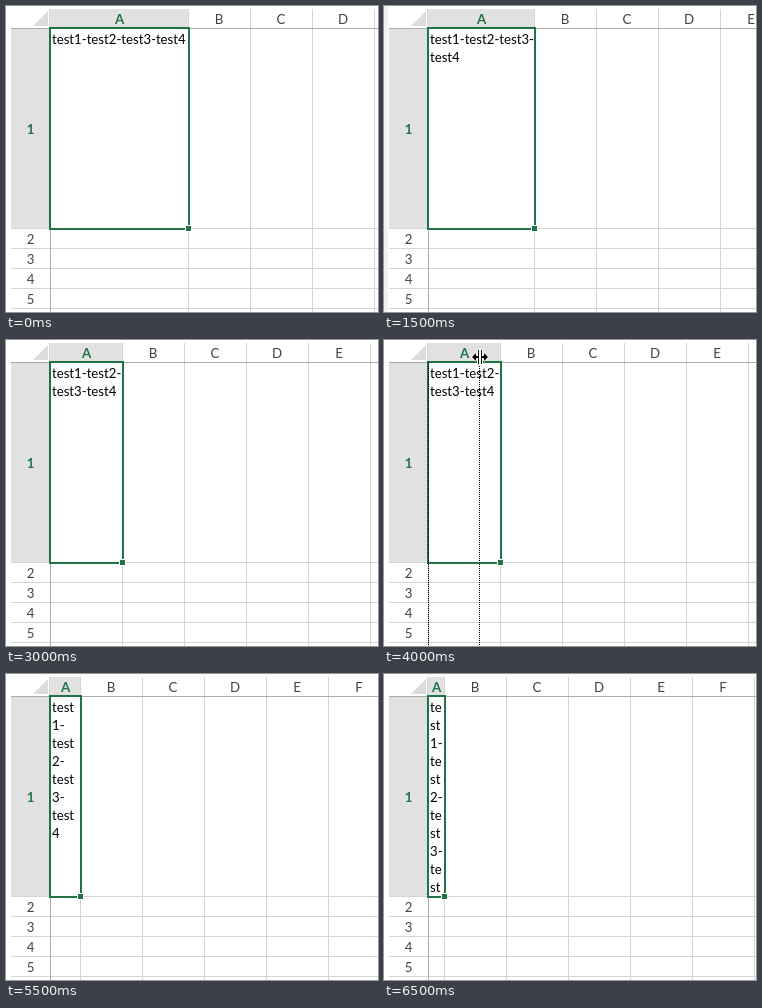
Animation of 372x306 px, one loop 7 s. Source, as an HTML page with a canvas:

```html
<!DOCTYPE html>
<html lang="en">
<head>
<meta charset="utf-8">
<title>Column resize</title>
<style>
html, body { margin: 0; width: 100%; height: 100%; overflow: hidden; background: #fff; }
canvas { display: block; }
</style>
</head>
<body>
<canvas id="stage" width="372" height="306"></canvas>
<script>
const ctx = document.getElementById('stage').getContext('2d');
const W = 372, H = 306, LEFT = 44, TOP = 22, BOTTOM = 222, COLUMN = 62, STEP = 500;
const GREEN = '#217346', GRID = '#d4d4d4', RULE = '#ababab', SHADE = '#e1e1e1';

const wrapped = {
  one: ['test1-test2-test3-test4'],
  two: ['test1-test2-test3-', 'test4'],
  half: ['test1-test2-', 'test3-test4'],
  four: ['test1-', 'test2-', 'test3-', 'test4'],
  eight: ['test', '1-', 'test', '2-', 'test', '3-', 'test', '4'],
  narrow: ['te', 'st', '1-', 'te', 'st', '2-', 'te', 'st', '3-', 'te', 'st']
};

// edge: right side of column A; cursor: [x, y]; guide: dragged dotted line
const steps = [
  { edge: 182, lines: wrapped.one },
  { edge: 182, lines: wrapped.one, cursor: [183, 12] },
  { edge: 182, lines: wrapped.one, cursor: [151, 11], guide: 150 },
  { edge: 150, lines: wrapped.two, margin: true },
  { edge: 150, lines: wrapped.two, margin: true, cursor: [149, 12] },
  { edge: 151, lines: wrapped.two, cursor: [147, 9], guide: 146 },
  { edge: 116, lines: wrapped.half },
  { edge: 116, lines: wrapped.half, cursor: [115, 9] },
  { edge: 116, lines: wrapped.half, cursor: [96, 17], guide: 95 },
  { edge: 95, lines: wrapped.four },
  { edge: 95, lines: wrapped.four, cursor: [85, 15], guide: 83 },
  { edge: 74, lines: wrapped.eight },
  { edge: 74, lines: wrapped.eight, cursor: [62, 18], guide: 60 },
  { edge: 60, lines: wrapped.narrow }
];

function rect(color, x, y, w, h) {
  ctx.fillStyle = color;
  ctx.fillRect(x, y, w, h);
}

function polygon(color, ...points) {
  ctx.fillStyle = color;
  ctx.beginPath();
  points.forEach(([x, y]) => ctx.lineTo(x, y));
  ctx.fill();
}

function label(text, x, y, active) {
  ctx.font = (active ? 'bold ' : '') + '13.3px Lato, sans-serif';
  ctx.fillStyle = active ? GREEN : '#444';
  ctx.textAlign = 'center';
  ctx.fillText(text, x, y);
}

function drawSheet(edge) {
  rect(SHADE, LEFT, 3, edge - LEFT, TOP - 3);
  rect(SHADE, 5, TOP + 1, LEFT - 5, BOTTOM - TOP - 1);
  polygon('#dcdcdc', [42, 5], [42, 20], [27, 20]);

  for (let x = edge; x < W; x += COLUMN) rect(GRID, x, 3, 1, H - 3);
  for (let y = BOTTOM; y < H; y += 20) rect(GRID, 5, y, W - 5, 1);
  rect(GRID, LEFT - 1, 3, 1, TOP - 3);
  rect(RULE, 5, TOP, W - 5, 1);
  rect(RULE, LEFT, TOP, 1, H - TOP);

  label('A', (LEFT + edge) / 2 + 0.5, 18, true);
  [...'BCDEF'].forEach((name, i) => label(name, edge + COLUMN * (i + 0.5), 18));
  label('1', 24.5, 128, true);
  [...'2345'].forEach((name, i) => label(name, 24.5, 238 + 20 * i));
}

function drawCell(edge, lines) {
  ctx.font = '13.2px Lato, sans-serif';
  ctx.fillStyle = '#000';
  ctx.textAlign = 'left';
  lines.forEach((line, i) => ctx.fillText(line, 46, 38 + 18 * i));

  ctx.strokeStyle = GREEN;
  ctx.lineWidth = 2;
  ctx.strokeRect(LEFT, TOP, edge - LEFT + 1, BOTTOM - TOP + 1);
  rect('#fff', edge - 3, BOTTOM - 3, 7, 7);
  rect(GREEN, edge - 2, BOTTOM - 2, 5, 5);
}

function drawGuide(x) {
  for (let y = TOP; y < H; y += 2) rect('#000', x, y, 1, 1);
}

function drawCursor([x, y]) {
  rect('#fff', x - 3, y - 8, 6, 16);
  for (const side of [-1, 1]) {
    polygon('#fff', [x + side * 9, y], [x + side * 4, y - 5], [x + side * 4, y + 5]);
    polygon('#000', [x + side * 8, y], [x + side * 4, y - 4], [x + side * 4, y + 4]);
    rect('#000', side < 0 ? x - 5 : x + 1, y - 1, 4, 2);
    rect('#000', side < 0 ? x - 2 : x + 1, y - 7, 1, 14);
  }
}

function draw(now) {
  const { edge, lines, cursor, guide, margin } = steps[Math.floor(now / STEP) % steps.length];
  rect('#fff', 0, 0, W, H);
  if (margin) rect('#f1f1f1', 0, 0, 4, H);
  drawSheet(edge);
  drawCell(edge, lines);
  if (guide) {
    drawGuide(LEFT);
    drawGuide(guide);
  }
  if (cursor) drawCursor(cursor);
  requestAnimationFrame(draw);
}

requestAnimationFrame(draw);
</script>
</body>
</html>
```
